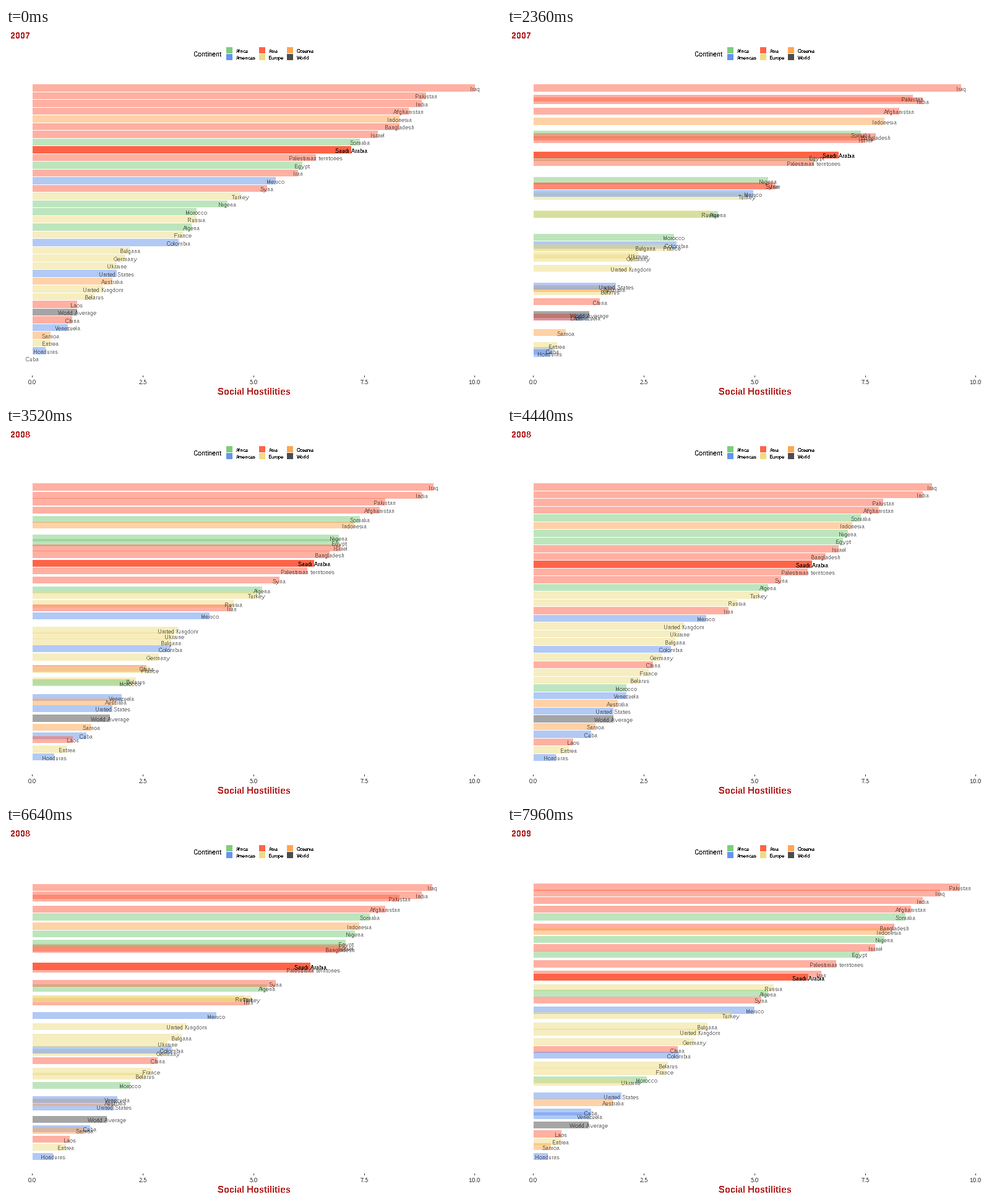
Write a matplotlib script that moves like this. It is 800x600 px and loops after 8000 ms.

```python
import matplotlib.pyplot as plt
from matplotlib.animation import FuncAnimation
from matplotlib.patches import Rectangle

plt.rcParams.update({
    "font.family": "Liberation Sans",
    "text.hinting": "native",
    "text.hinting_factor": 1,
})

W, H, DPI = 800, 600, 100
FRAMES, INTERVAL = 200, 40
FIRST_MOVE, MOVE, PERIOD = 18, 94, 113   # timing in frames
X0, UNIT = 43, 71.5                      # value axis
Y0, ROW = 96.9, 12.5                     # centre of the top bar, row step
BAR = 0.9 * ROW
RED = "#B22222"
YEARS = ("2007", "2008", "2009")
FOCUS = "Saudi Arabia"

COLORS = {
    "Africa": "#7CCD7C", "Americas": "#6495ED",
    "Asia": "#FF6347", "Europe": "#EEDC82",
    "Oceania": "#FFA54F", "World": "#4D4D4D",
}

# name, continent, score in each year; listed in the order of the first year
DATA = [
    ("Iraq", "Asia", 10.0, 9.0, 9.2),
    ("Pakistan", "Asia", 8.9, 7.9, 9.8),
    ("India", "Asia", 8.8, 8.8, 8.8),
    ("Afghanistan", "Asia", 8.5, 7.8, 8.6),
    ("Indonesia", "Oceania", 8.3, 7.2, 8.1),
    ("Bangladesh", "Asia", 8.3, 6.6, 8.3),
    ("Israel", "Asia", 7.8, 6.9, 7.8),
    ("Somalia", "Africa", 7.4, 7.4, 8.5),
    ("Saudi Arabia", "Asia", 7.2, 6.3, 6.2),
    ("Palestinian territories", "Asia", 6.4, 6.2, 6.9),
    ("Egypt", "Africa", 6.1, 7.0, 7.4),
    ("Iran", "Asia", 6.0, 4.4, 6.7),
    ("Mexico", "Americas", 5.5, 3.9, 5.1),
    ("Syria", "Asia", 5.3, 5.6, 5.1),
    ("Turkey", "Europe", 4.7, 5.1, 4.4),
    ("Nigeria", "Africa", 4.4, 7.1, 8.0),
    ("Morocco", "Africa", 3.7, 2.1, 2.6),
    ("Russia", "Europe", 3.7, 4.6, 5.5),
    ("Algeria", "Africa", 3.6, 5.3, 5.3),
    ("France", "Europe", 3.4, 2.6, 3.0),
    ("Colombia", "Americas", 3.3, 3.1, 3.3),
    ("Bulgaria", "Europe", 2.2, 3.2, 4.0),
    ("Germany", "Europe", 2.1, 2.9, 3.7),
    ("Ukraine", "Europe", 1.9, 3.3, 2.1),
    ("United States", "Americas", 1.9, 1.8, 2.0),
    ("Australia", "Oceania", 1.8, 1.9, 1.8),
    ("United Kingdom", "Europe", 1.6, 3.4, 3.8),
    ("Belarus", "Europe", 1.4, 2.4, 3.1),
    ("Laos", "Asia", 1.0, 0.9, 0.6),
    ("World Average", "World", 1.0, 1.8, 1.2),
    ("China", "Asia", 0.9, 2.7, 3.31),
    ("Venezuela", "Americas", 0.8, 2.1, 1.2),
    ("Samoa", "Oceania", 0.4, 1.4, 0.3),
    ("Eritrea", "Europe", 0.4, 0.8, 0.6),
    ("Honduras", "Americas", 0.3, 0.5, 0.3),
    ("Cuba", "Americas", 0.0, 1.3, 1.3),
]
N = len(DATA)


def rank_years():
    """Rank of each row per year; ties keep the order of the year before."""
    order, ranks = list(range(N)), []
    for year in range(len(YEARS)):
        order = sorted(order, key=lambda i: -DATA[i][2 + year])
        place = [0] * N
        for pos, i in enumerate(order):
            place[i] = pos
        ranks.append(place)
    return ranks


RANKS = rank_years()

fig = plt.figure(figsize=(W / DPI, H / DPI), dpi=DPI, facecolor="white")
ax = fig.add_axes([0, 0, 1, 1])
ax.set_xlim(0, W)
ax.set_ylim(H, 0)
ax.axis("off")


def label(x, y, s, px, color="black", **kw):
    return ax.text(x, y, s, fontsize=px * 72 / DPI, color=color,
                   va="baseline", antialiased=False, **kw)


def box(x, y, w, h, color, alpha=1):
    return ax.add_patch(Rectangle((x, y), w, h, facecolor=color, alpha=alpha,
                                  linewidth=0, antialiased=False))


def draw_legend():
    label(304, 46, "Continent", 11)
    for i, (name, color) in enumerate(COLORS.items()):
        x, y = (356, 409, 454)[i // 2], 31 + 11 * (i % 2)
        box(x, y, 10, 10, color)
        label(x + 15.5, y + 9, name, 8)


def draw_axis():
    for v in (0, 2.5, 5, 7.5, 10):
        x = X0 + v * UNIT
        box(round(x - 0.6), 562, 1, 3, "#333333")
        label(x - 0.5, 576, f"{v:.1f}", 9, "#4D4D4D", ha="center")
    label(401, 593, "Social Hostilities", 15, RED, ha="center", weight="bold")


draw_legend()
draw_axis()
year_text = label(8, 17, YEARS[0], 14, RED, weight="bold")

bars, names = [], []
for name, continent, *_ in DATA:
    alpha = 1 if name == FOCUS else 0.5
    bars.append(box(X0, 0, 0, BAR, COLORS[continent], alpha))
    names.append(label(X0, 0, name, 9, alpha=alpha, ha="center"))


def ease(t):
    return 4 * t ** 3 if t < 0.5 else 1 - 4 * (1 - t) ** 3


def update(k):
    step = 0 if k < FIRST_MOVE + PERIOD else 1
    t = min(max((k - FIRST_MOVE - step * PERIOD) / MOVE, 0), 1)
    p = ease(t)
    year_text.set_text(YEARS[step + (t >= 0.5)])
    for i, row in enumerate(DATA):
        v0, v1 = row[2 + step], row[3 + step]
        r0, r1 = RANKS[step][i], RANKS[step + 1][i]
        width = (v0 + (v1 - v0) * p) * UNIT
        y = Y0 + (r0 + (r1 - r0) * p) * ROW
        bars[i].set_y(y - BAR / 2)
        bars[i].set_width(width)
        names[i].set_position((X0 + width, y + 5))
        # higher ranks lie on top
        bars[i].set_zorder(2 - r0 / N)
        names[i].set_zorder(4 - r0 / N)
    return [year_text, *bars, *names]


anim = FuncAnimation(fig, update, frames=FRAMES, interval=INTERVAL,
                     init_func=lambda: update(0), repeat=True,
                     repeat_delay=0, blit=False)
plt.show()
```
